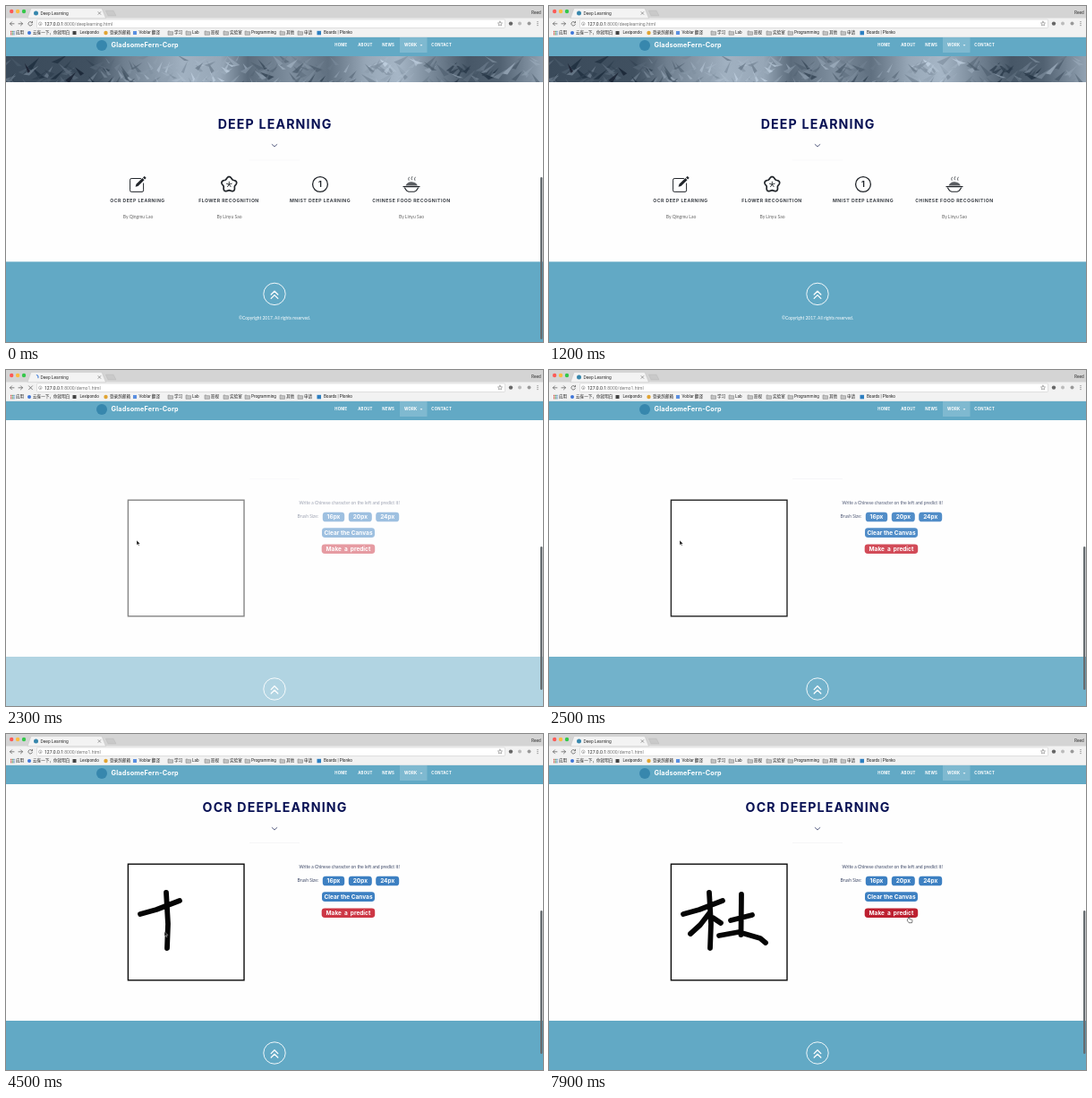
These frames come from a looping animation (600 px wide and 375 px high, 8 s). An HTML page:

```html
<!DOCTYPE html>
<html lang="en">
<head>
<meta charset="utf-8">
<title>Deep Learning</title>
<style>
  html, body { margin: 0; width: 100%; height: 100%; overflow: hidden; background: #fefefe; }
  svg { display: block; width: 100vw; height: 100vh; }
  text { white-space: pre; }
  .ui { font-family: Roboto, "Noto Sans CJK SC", "Noto Sans CJK", sans-serif; }
  .bold { font-family: Inter, sans-serif; font-weight: 700; }
  .body { font-family: Lato, sans-serif; }
  .line { fill: none; stroke-linecap: round; stroke-linejoin: round; }
</style>
</head>
<body>
<svg id="stage" viewBox="0 0 600 375"></svg>
<script>
const LOOP = 8000, STEP = 100;
const BLUE = '#62a9c5', NAVY = '#081154', INK = '#22262b', MARK = '#3787ad';

const text = (cls, x, y, size, str, attrs = '') =>
  `<text class="${cls}" x="${x}" y="${y}" font-size="${size}" ${attrs}>${str}</text>`;
const mid = (cls, x, y, size, str, attrs = '') => text(cls, x, y, size, str, 'text-anchor="middle" ' + attrs);
const box = (x, y, w, h, fill, attrs = '') =>
  `<rect x="${x}" y="${y}" width="${w}" height="${h}" fill="${fill}" ${attrs}/>`;
const dot = (x, y, r, fill, attrs = '') => `<circle cx="${x}" cy="${y}" r="${r}" fill="${fill}" ${attrs}/>`;
const line = (d, color, width = 1, attrs = '') =>
  `<path class="line" d="${d}" stroke="${color}" stroke-width="${width}" ${attrs}/>`;
const shape = (d, fill, attrs = '') => `<path d="${d}" fill="${fill}" ${attrs}/>`;

function browser() {
  const lights = ['#fc5b57', '#fdbc40', '#34c84a'].map((c, i) => dot(6.2 + 6.9 * i, 6, 2.2, c)).join('');
  const folders = [[181, '学习'], [201, 'Lab'], [222, '影视'], [243, '实验室'], [267, 'Programming'], [306, '其他'], [326, '申请']]
    .map(([x, name]) => shape(`M${x} 28h2l.6.7h2.9v3.6h-5.5z`, '#c4c4c4', 'stroke="#777" stroke-width=".5"')
      + text('ui', x + 7, 31.4, 4.6, name)).join('');
  const links = [[11, '应用'], [30, '云雀一下，你就明白'], [82.5, 'Lexipondo'], [116, '登录鸽邮箱'], [148.5, 'Voblar 翻译'], [355, 'Boards | Plonko']]
    .map(([x, name]) => text('ui', x, 31.4, 4.6, name)).join('');
  const apps = [...Array(9)].map((_, i) =>
    box(5 + i % 3 * 1.7, 27.8 + (i / 3 | 0) * 1.7, 1.2, 1.2, ['#d9534f', '#5a9a58', '#4b83c4'][i % 3])).join('');
  return box(0, 0, 600, 14, '#d4d4d4') + box(0, 13.5, 600, 21.5, '#f2f2f2') + lights
    + shape('M24 13.7L28 2.6H107L111.5 13.7z', '#f3f3f3', 'stroke="#bbb" stroke-width=".4"')
    + shape('M111.5 5.2H120L123 10.8H114z', '#c9c9c9', 'stroke="#b4b4b4" stroke-width=".4"')
    + dot(33.5, 8, 2.5, MARK, 'id="favicon"')
    + line('M33.5 5.5A2.5 2.5 0 0 0 31 8', '#3a78d6', 1, 'id="spinner"')
    + text('ui', 38.5, 9.8, 4.9, 'Deep Learning', 'fill="#333"')
    + line('M103 6.6l2.8 2.8m0-2.8l-2.8 2.8', '#666', .6)
    + text('ui', 587, 8.5, 4.8, 'Reed', 'fill="#333"')
    + line('M9 19.8H4.5m2-2l-2 2l2 2M14 19.8h4.5m-2-2l2 2l-2 2', '#666', .8)
    + line('M29.2 18.5A2.3 2.3 0 1 0 29.4 20.6M29.5 17.3v1.5H28', '#666', .8, 'id="reload"')
    + line('M25.5 17.8l4 4m0-4l-4 4', '#666', .8, 'id="stop"')
    + box(34.5, 15, 523, 9.5, '#fff', 'rx="1" stroke="#c4c4c4" stroke-width=".5"')
    + dot(38.3, 19.8, 1.8, 'none', 'stroke="#777" stroke-width=".5"') + box(38, 19.5, .6, 1.5, '#777')
    + `<text class="ui" x="43" y="21.7" font-size="5.05" fill="#222">127.0.0.1<tspan fill="#777">:8000/<tspan id="file"></tspan></tspan></text>`
    + line('M552 17.2l.7 1.6 1.8.2-1.3 1.2.3 1.7-1.5-.9-1.5.9.3-1.7-1.3-1.2 1.8-.2z', '#666', .5)
    + dot(564, 19.6, 2.2, '#666') + dot(574, 19.6, 2, '#bbb') + dot(584.5, 19.6, 2, '#999')
    + [17.6, 19.6, 21.6].map(y => dot(594, y, .55, '#666')).join('')
    + `<g fill="#222">${apps}${dot(26, 30, 2, '#3f75d8')}${box(74.5, 28, 4, 4, '#444')}${dot(111.5, 30, 2.2, '#e0a433')}${box(142, 28, 4, 4, '#5b8fe0')}${box(347.5, 27.8, 4.5, 4.5, '#2d7fc1')}${links}${folders}</g>`
    + box(0, 34.5, 600, .5, '#c5d5dc');
}

function navbar() {
  const items = [[367.3, 'HOME'], [393.2, 'ABOUT'], [420.2, 'NEWS'], [445, 'WORK'], [475.3, 'CONTACT']]
    .map(([x, name]) => text('bold', x, 45.2, 4.3, name, 'fill="#fff" letter-spacing=".2"')).join('');
  return box(0, 35, 600, 21, BLUE) + box(440, 35, 30.5, 17, '#7fb9d0') + dot(107, 44, 6, MARK)
    + text('bold', 117.5, 46.4, 7.3, 'GladsomeFern-Corp', 'fill="#fff" letter-spacing=".15"')
    + items + shape('M462.7 43.2h2.6l-1.3 1.5z', '#fff');
}

function mountains() {
  let seed = 11;
  const rnd = () => (seed = seed * 16807 % 2147483647) / 2147483647;
  // Brightness along the ridge: share of the width, grey level
  const ridge = [[0, 72], [.16, 78], [.22, 125], [.33, 175], [.4, 165], [.45, 105], [.53, 140], [.6, 110],
    [.67, 165], [.73, 180], [.8, 130], [.86, 85], [.92, 95], [1, 160]];
  const tone = v => `rgb(${[-14, 2, 18].map(d => Math.max(20, Math.min(235, v + d)) | 0)})`;
  const level = p => {
    const i = Math.max(1, ridge.findIndex(([at]) => at >= p)), [a, u] = ridge[i - 1], [b, v] = ridge[i];
    return u + (v - u) * (p - a) / (b - a);
  };
  const stops = ridge.map(([at, v]) => `<stop offset="${at}" stop-color="${tone(v)}"/>`).join('');
  let art = box(0, 56, 600, 29, 'url(#rock)');
  for (let i = 0; i < 260; i++) {
    const p = rnd(), x = p * 600, y = 54 + rnd() * 30, lean = rnd() < .5 ? -1 : 1;
    const w = lean * (5 + rnd() * 13), h = 4 + rnd() * 9, thick = 1 + rnd() * 4;
    const v = level(p) + (rnd() - .5) * 110;
    art += shape(`M${x} ${y}l${w} ${h}l${-w * .4} ${thick - h * .2}z`, tone(v), 'opacity=".75"');
  }
  return `<linearGradient id="rock">${stops}</linearGradient>`
    + `<clipPath id="strip">${box(0, 56, 600, 29, '#000')}</clipPath><g clip-path="url(#strip)">${art}</g>`;
}

const chevron = y => line(`M297.2 ${y}l2.8 2.6l2.8-2.6`, '#333c66', .8);
const divider = y => box(272, y, 56, .6, '#f0f0f4');
const heading = (y, str) => mid('bold', 300.6, y, 14.2, str, `fill="${NAVY}" letter-spacing="1.15"`) + chevron(y + 17.5);

function flower(cx, cy) {
  const pts = [...Array(60)].map((_, i) => {
    const a = i / 60 * 2 * Math.PI, r = 7.6 + 1.1 * Math.cos(5 * a);
    return `${(cx + r * Math.sin(a)).toFixed(2)} ${(cy - r * Math.cos(a)).toFixed(2)}`;
  });
  const rays = [...Array(5)].map((_, i) => {
    const a = i * .4 * Math.PI;
    return `M${cx} ${cy}l${3 * Math.sin(a)} ${-3 * Math.cos(a)}`;
  }).join('');
  return line(`M${pts.join('L')}z`, INK, 1.7) + line(rays, INK, .9);
}

function coursePage() {
  const label = (x, str) => mid('bold', x, 219.2, 5.2, str, 'fill="#3c4047" letter-spacing=".45"');
  const author = (x, str) => mid('body', x, 236.8, 5, 'By ' + str, 'fill="#666"');
  const pencil = line('M150.5 192.5H140.2a1.6 1.6 0 0 0-1.6 1.6V205.8a1.6 1.6 0 0 0 1.6 1.6H152a1.6 1.6 0 0 0 1.6-1.6V198', INK, 1)
    + shape('M144.6 201.8l.9-3.1l6.9-6.6l2.1 2.1l-6.9 6.7zM153 191.5l1.3-1.3q.4-.3.8 0l1.3 1.3q.4.4 0 .8l-1.3 1.3z', INK);
  const bowl = line('M444 201.6H462', INK, 1.3)
    + line('M445.5 203Q447.5 206.8 450 207.2H456Q458.5 206.8 460.5 203', INK, 1.1)
    + shape('M446.5 200.6Q448 196.4 453 196.2Q458.5 196.6 459.8 200.6z', '#5a5d61')
    + line('M450 194.5q-1.2-1.6 .4-3.4M453.4 194q-1.3-1.6 .4-3.6M456.8 194.5q-1.2-1.6 .4-3.4', '#44484d', .8);
  return mountains() + heading(137, 'DEEP LEARNING') + divider(171.7)
    + `<g id="pencil">${pencil}</g><g id="pushed">${label(147, 'OCR DEEP LEARNING')}${author(147.5, 'Qingmu Lao')}</g>`
    + flower(249.3, 199.2) + label(249, 'FLOWER RECOGNITION') + author(249.5, 'Linyu Sao')
    + dot(351, 199, 8.4, 'none', `stroke="${INK}" stroke-width="1.3"`) + mid('bold', 351, 202.3, 9, '1', `fill="${INK}"`)
    + label(351, 'MNIST DEEP LEARNING') + bowl + label(453, 'CHINESE FOOD RECOGNITION') + author(453, 'Linyu Sao');
}

function drawPage() {
  const button = (x, y, w, str, fill, attrs = '') => box(x, y, w, 10.6, fill, `rx="3.4" ${attrs}`)
    + mid('bold', x + w / 2, y + 7.6, 6.5, str, 'fill="#fff"');
  return `<g id="title">${heading(87, 'OCR DEEPLEARNING')}</g>` + divider(121)
    + box(136.4, 145.2, 129.6, 129.6, '#fff', 'stroke="#0a0a0a" stroke-width="1.4"')
    + line('', '#050505', 5.8, 'id="ink"')
    + text('body', 327.5, 149.8, 5, 'Write a Chinese character on the left and predict it!', 'fill="#3c4766"')
    + text('body', 325.5, 165.2, 4.9, 'Brush Size:', 'fill="#3c4766"')
    + button(353.8, 158.7, 24.4, '16px', '#3d80c2') + button(382.8, 158.7, 26, '20px', '#3d80c2')
    + button(413.2, 158.7, 26, '24px', '#3d80c2') + button(353, 176.3, 59, 'Clear the Canvas', '#3d80c2')
    + button(352.7, 194.4, 59.5, 'Make\u00a0 a\u00a0 predict', '#cd3745', 'id="predict"');
}

const footer = box(0, 0, 600, 375, BLUE) + dot(300, 36, 12.2, 'none', 'stroke="#fff" stroke-width=".9"')
  + line('M296.2 36.6l3.8-3.8l3.8 3.8M296.2 41l3.8-3.8l3.8 3.8', '#fff', 1.3)
  + mid('body', 300, 64.8, 4.9, '©Copyright 2017. All rights reserved.', 'fill="#fff"');

const arrow = shape('M0 0V5.4L1.3 4.2L2.2 6.2L3 5.8L2.2 3.9H3.9z', '#111', 'stroke="#fff" stroke-width=".4" id="arrow"');
const hand = shape('M-.9 .4Q-.3-.4.3.4V2.2L3 2.8Q3.6 3 3.5 3.8L3 6.2H-.4L-2.2 3.8Q-2-.2 3-.9 3.8z', '#fff',
  'stroke="#222" stroke-width=".6" id="hand"');

const stage = document.getElementById('stage');
stage.innerHTML = box(0, 0, 600, 375, '#fefefe')
  + `<g id="course">${coursePage()}</g><g id="draw">${drawPage()}</g><g id="footer">${footer}</g>`
  + box(0, 56, 600, 319, '#fff', 'id="veil"') + navbar() + browser()
  + box(597, 0, 2.4, 10, '#666c70', 'rx="1.2" id="thumb"') + `<g id="cursor">${arrow}${hand}</g>`;

const el = Object.fromEntries([...stage.querySelectorAll('[id]')].map(e => [e.id, e]));
const set = (name, attrs) => { for (const k in attrs) el[name].setAttribute(k, attrs[k]); };
const show = (name, on) => set(name, { visibility: on ? 'visible' : 'hidden' });
const ramp = (t, a, b) => Math.min(1, Math.max(0, (t - a) / (b - a)));

// Pointer path: time, x, y, pen down on the way there
const moves = [
  [2300, 146, 190, 0], [2600, 146, 190, 0], [2900, 150, 201, 0], [3100, 168, 196, 1], [3350, 194, 186, 1],
  [3700, 179, 177, 0], [4000, 181, 212, 1], [4300, 180, 239, 1], [4500, 177, 220.5, 0], [4700, 179, 200, 0],
  [4900, 169, 213, 1], [5100, 158, 223, 1], [5300, 183, 205, 0], [5450, 192, 211, 1], [5700, 215, 179, 0],
  [6000, 214.5, 224, 1], [6200, 203, 208, 0], [6400, 227, 202, 1], [6550, 190, 225, 0], [6700, 212, 221, 1],
  [6850, 236, 228, 1], [7000, 242, 233, 1], [7600, 402.5, 204.5, 0]
];

function pointer(t) {
  let [, x, y] = moves[0], ink = '', pen = false;
  for (let i = 1; i < moves.length && t > moves[i - 1][0]; i++) {
    const [t0, x0, y0] = moves[i - 1], [t1, x1, y1, down] = moves[i];
    const p = ramp(t, t0, t1);
    x = x0 + (x1 - x0) * p;
    y = y0 + (y1 - y0) * p;
    if (down) ink += (pen ? '' : `M${x0} ${y0}`) + `L${x} ${y}`;
    pen = down;
  }
  return { x, y, ink };
}

function render(t) {
  const drawing = t >= 2300, loading = t >= 1800 && t < 2400;
  const grow = ramp(t, 1400, 1700);
  show('course', !drawing);
  show('draw', drawing);
  show('favicon', !loading);
  show('spinner', loading);
  show('reload', !loading);
  show('stop', loading);
  set('spinner', { transform: `rotate(${t * .36} 33.5 8)` });
  el.file.textContent = t < 1800 ? 'deeplearning.html' : 'demo1.html';

  set('pencil', { transform: `translate(147.5 189.5) scale(${1 + grow}) translate(-147.5 -189.5)` });
  set('pushed', { transform: `translate(0 ${18 * grow})` });
  set('footer', { transform: `translate(0 ${drawing ? 320 : 285.4 + 18 * grow})` });
  set('veil', { opacity: drawing ? .5 * (1 - ramp(t, 2300, 2550)) : 0 });
  set('title', { opacity: ramp(t, 2550, 3100) });
  set('thumb', drawing ? { y: 197, height: 160, opacity: 1 } : { y: 191, height: 181, opacity: 1 - ramp(t, 400, 700) });

  const { x, y, ink } = pointer(t), hover = t >= 7500;
  set('ink', { d: ink });
  set('cursor', { transform: `translate(${x} ${y})` });
  show('cursor', drawing);
  set('arrow', { opacity: hover ? 0 : 1 });
  set('hand', { opacity: hover ? 1 : 0 });
  set('predict', { fill: hover ? '#bd2030' : '#cd3745' });
}

const start = performance.now();
function frame() {
  const t = (performance.now() - start) % LOOP;
  render(Math.floor(t / STEP) * STEP);
  requestAnimationFrame(frame);
}
frame();
</script>
</body>
</html>
```
